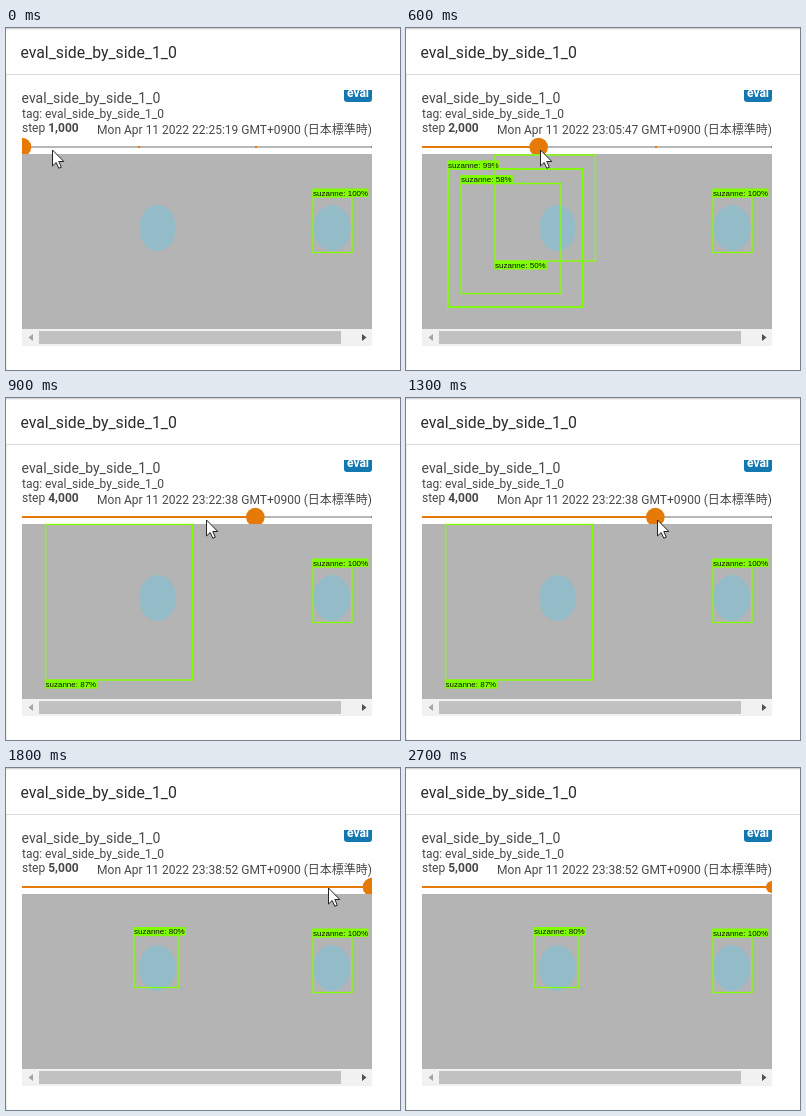
Write an HTML page that moves like this. It is 394 px wide and 342 px high and loops after 2800 ms.

```html
<!DOCTYPE html>
<html lang="en">
<head>
<meta charset="utf-8">
<title>Evaluation slider</title>
<style>
  html, body { margin: 0; width: 100%; height: 100%; overflow: hidden; background: #fff; }
  svg { display: block; width: 394px; height: 342px; font: 12px Roboto, "Noto Sans CJK JP", "Noto Sans CJK", sans-serif; fill: #484848; }
  text { white-space: pre; }
  .box { fill: none; stroke: #7fff00; }
  .label { fill: #7fff00; }
  .caption { font: 8px "Liberation Sans", sans-serif; fill: #111; }
</style>
</head>
<body>
<svg viewBox="0 0 394 342">
  <defs>
    <clipPath id="trackClip"><path d="M16 106H366V126H16Z"/></clipPath>
    <clipPath id="badgeClip"><path d="M338 62H366V74H338Z"/></clipPath>
  </defs>
  <path d="M0 0H394V1H0Z" fill="#d5d5d5"/>
  <path d="M0 1H394V2H0Z" fill="#f0f0f0"/>
  <path d="M0 342V46.5H394" fill="none" stroke="#dcdcdc"/>
  <text x="14.4" y="30" font-size="15.8" fill="#2b2b2b">eval_side_by_side_1_0</text>
  <text x="15.6" y="75" font-size="14">eval_side_by_side_1_0</text>
  <text x="16" y="90">tag: eval_side_by_side_1_0</text>
  <text x="16" y="104">step <tspan id="step" font-weight="700"></tspan></text>
  <text id="date" x="366" y="106" text-anchor="end"></text>
  <g clip-path="url(#badgeClip)">
    <rect x="338" y="54" width="28" height="20" rx="3" fill="#1478b0"/>
    <text x="352" y="69" text-anchor="middle" font-weight="700" fill="#fff">eval</text>
  </g>

  <g clip-path="url(#trackClip)" fill="#e57a08">
    <path d="M16 118H366V120H16Z" fill="#b8b8b8"/>
    <path d="M132 118h2v2h-2ZM249 118h2v2h-2ZM365 118h2v2h-2Z"/>
    <rect id="progress" x="16" y="118" height="2"/>
    <circle id="knob" cy="119"/>
  </g>

  <path d="M16 126H366V301H16Z" fill="#b4b4b4"/>
  <g fill="#93bcc8">
    <ellipse cx="151.5" cy="200" rx="18.5" ry="23"/>
    <ellipse cx="326" cy="200" rx="18.5" ry="23"/>
  </g>
  <g id="detections"></g>

  <path d="M16 301H366V318H16Z" fill="#f1f1f1"/>
  <path d="M33 303H335V316H33Z" fill="#c1c1c1"/>
  <path d="M27 306V313L22.5 309.5Z" fill="#a3a3a3"/>
  <path d="M356 306V313L360.5 309.5Z" fill="#505050"/>

  <path id="cursor" d="M.5 .5V16.5L4.2 13L6.8 18.8L9.3 17.7L6.8 12H11.8Z" fill="#fff" stroke="#222"/>
</svg>
<script>
const $ = id => document.getElementById(id);

// Each box: left, top, right, bottom, score, label below?, line width
const steps = [
  { step: "1,000", time: "22:25:19", boxes: [] },
  { step: "2,000", time: "23:05:47", boxes: [
    [42, 141, 176.5, 279, 99, false, 1.8],
    [55, 155.5, 155, 265.5, 58, false, 1.4],
    [89, 127, 189.5, 233, 50, true, 1.4]] },
  { step: "4,000", time: "23:22:38", boxes: [[39.5, 126.5, 186.5, 282, 87, true, 1.4]] },
  { step: "5,000", time: "23:38:52", boxes: [[128, 167.5, 173, 219.5, 80, false, 1.3]] }
];
const always = [307, 169, 346, 224.5, 100, false, 1.3];

// Cursor x for every 100 ms tick; it rests at the last value
const cursorX = [46, 66, 88, 106, 120, 130, 134, 150, 174, 200, 228, 246, 246,
  251, 262, 276, 289, 301, 322, 342, 352, 352, 354];
const LOOP = 2800, TICK = 100, LEFT = 16, GAP = 350 / 3;

function detection([l, t, r, b, score, below, width]) {
  const top = below ? b : t - 8.5;
  return `<rect class="box" x="${l}" y="${t}" width="${r - l}" height="${b - t}" stroke-width="${width}"/>
    <rect class="label" x="${l - .7}" y="${top}" width="${score > 99 ? 56 : 52.5}" height="8.5"/>
    <text class="caption" x="${l}" y="${top + 7}">suzanne: ${score}%</text>`;
}

let shown = -1;
function showStep(index) {
  if (index === shown) return;
  shown = index;
  const { step, time, boxes } = steps[index];
  $("step").textContent = step;
  $("date").textContent = `Mon Apr 11 2022 ${time} GMT+0900 (日本標準時)`;
  $("detections").innerHTML = [...boxes, always].map(detection).join("");
  $("progress").setAttribute("width", index * GAP);
  $("knob").setAttribute("cx", LEFT + index * GAP);
}

function draw(now) {
  const tick = Math.floor(now % LOOP / TICK);
  const x = cursorX[Math.min(tick, cursorX.length - 1)];
  const gone = tick >= 27;
  showStep(Math.round((x - LEFT) / GAP)); // the knob snaps to the nearest step
  $("knob").setAttribute("r", gone ? 6 : 9.3);
  $("cursor").setAttribute("transform", `translate(${x} ${tick < 14 ? 121.5 : 119.5})`);
  $("cursor").setAttribute("visibility", gone ? "hidden" : "visible");
}

const start = performance.now();
function frame() {
  draw(performance.now() - start);
  requestAnimationFrame(frame);
}
frame();
</script>
</body>
</html>
```
